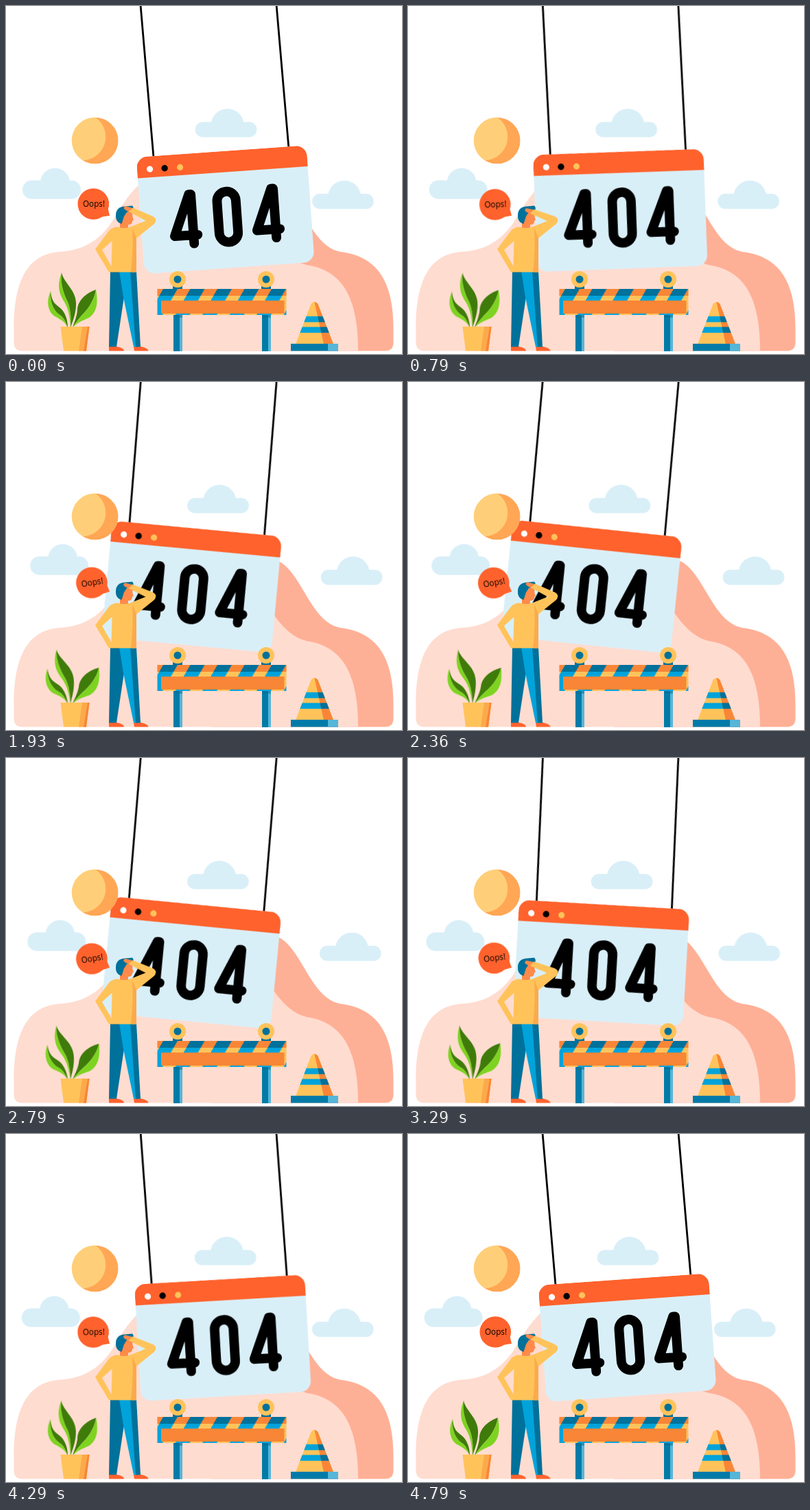
Recreate the animation shown at these times as an HTML page. Size 577 by 508 pixels, loop 4.87 s.

```html
<!DOCTYPE html>
<html lang="en">
<head>
<meta charset="utf-8">
<title>404</title>
<style>
  html, body { margin: 0; width: 100%; height: 100%; overflow: hidden; background: #fff; }
  svg { display: block; width: 577px; height: 508px; }

  .turn, .drift, .nod {
    animation: turn 4870ms cubic-bezier(.5, 0, .5, 1) infinite;
  }
  .drift { animation-name: drift; }
  .nod { animation-name: nod; }

  /* out and back, then a short rest before the loop restarts */
  @keyframes turn {
    0%, 98.4%, 100% { transform: rotate(0deg); }
    49.2% { transform: rotate(var(--a)); }
  }
  @keyframes drift {
    0%, 98.4%, 100% { transform: translateX(0); }
    49.2% { transform: translateX(var(--d)); }
  }
  @keyframes nod {
    0%, 49.2%, 98.4%, 100% { transform: rotate(0deg); }
    24.6%, 73.8% { transform: rotate(var(--a)); }
  }

  .sign { --a: 10deg; transform-origin: 285px 0; }
  .bubble { --a: -10deg; transform-origin: 150.5px 305.5px; }
  .leaf-l { --a: -5.5deg; transform-origin: 90px 470px; }
  .leaf-m { --a: -5.7deg; transform-origin: 94px 470px; }
  .leaf-r { --a: 5deg; transform-origin: 97px 470px; }
  .arm { --a: -6deg; transform-origin: 213px 312px; }
  .cloud-l { --d: 12.4px; animation-delay: -570ms; }
  .cloud-m { --d: -12.2px; }
  .cloud-r { --d: 13px; animation-delay: -300ms; }

  .red { fill: #ff622c; }
  .orange { fill: #f98637; }
  .amber { fill: #fbaa4b; }
  .yellow { fill: #ffc35a; }
  .navy { fill: #00719a; }
  .blue { fill: #00a3da; }
  .steel { fill: #007ba8; }
  .pale { fill: #55b6d8; }
  .ice { fill: #d9eff8; }
  .green { fill: #7ed321; }
  .moss { fill: #3f7b0a; }
  .skin { fill: #ff8a4a; }
  .digits { fill: none; stroke: #000; stroke-width: 13.8; stroke-linecap: round; stroke-linejoin: round; }
  text { font: 11.7px "Open Sans", "Noto Sans", sans-serif; fill: #000; }
</style>
</head>
<body>
<svg viewBox="0 0 577 508" xmlns="http://www.w3.org/2000/svg">
  <defs>
    <clipPath id="sunClip"><circle cx="129.7" cy="196.5" r="34"/></clipPath>
    <clipPath id="signClip"><rect width="248.5" height="171" rx="16"/></clipPath>
    <clipPath id="coneClip"><path d="M444.500 435Q449.500 429 454.500 435L477 493.500H422Z"/></clipPath>
    <pattern id="bars" width="39.5" height="40" patternUnits="userSpaceOnUse" patternTransform="translate(229 413) skewX(-30)">
      <rect width="39.5" height="40" class="orange"/>
      <rect width="21" height="40" class="navy"/>
    </pattern>
    <pattern id="barsLight" width="39.5" height="40" patternUnits="userSpaceOnUse" patternTransform="translate(229 413) skewX(-30)">
      <rect width="39.5" height="40" class="yellow"/>
      <rect width="21" height="40" class="blue"/>
    </pattern>
    <g id="cloud" class="ice">
      <rect y="19.300" width="89.700" height="22.200" rx="11.100"/>
      <path d="M23 36V24A24 24 0 0 1 71 24V36Z"/>
    </g>
    <path id="four" d="M75.500 131.500V59.500H72.500L48 119H81.500"/>
    <g id="lamp">
      <rect x="-7" y="8" width="14" height="7" class="navy"/>
      <circle r="12" class="yellow"/>
      <circle r="5.500" class="navy"/>
    </g>
    <g id="post">
      <rect width="13" height="54" class="steel"/>
      <rect x="9" width="4" height="54" class="pale"/>
      <rect width="13" height="5" class="navy" opacity=".5"/>
    </g>
  </defs>

  <!-- hills -->
  <path fill="#feb096" d="M398 262C432 280 444 351 488 359C539 365 564.500 400 564.500 470V491Q564.500 503.500 552 503.500H300V262Z"/>
  <path fill="#ffdcd0" d="M24 503.500Q11.500 503.500 11.500 491V470C11.500 395 35 360 82 358.500C128 355 148 326 160 306C175 280 190 262 205 252C250 225 330 255 391 341C405 360 420 374 438 378C492 386 513 428 513 503.500Z"/>

  <!-- clouds -->
  <g class="drift cloud-l">
    <rect x="22.800" y="254.500" width="85" height="27.300" rx="13.600" class="ice"/>
    <circle cx="70.300" cy="258" r="21.500" class="ice"/>
  </g>
  <g class="drift cloud-m"><use href="#cloud" x="275.700" y="150"/></g>
  <g class="drift cloud-r"><use href="#cloud" x="445.800" y="254.700"/></g>

  <!-- hanging window -->
  <g class="turn sign">
    <path d="M193.600 -30L215.100 222M391.600 -30L412 208" stroke="#000" stroke-width="2.800"/>
    <g transform="translate(189.600 220.900) rotate(-4.070)">
      <g clip-path="url(#signClip)">
        <rect width="249" height="171" class="ice"/>
        <rect width="249" height="30.800" class="red"/>
      </g>
      <circle cx="18.700" cy="18.600" r="4.600" fill="#fff"/>
      <circle cx="40.300" cy="18.800" r="4.700"/>
      <circle cx="62.800" cy="19" r="4.600" class="yellow"/>
      <g class="digits">
        <use href="#four"/>
        <rect x="113" y="59" width="27.400" height="74" rx="13.700"/>
        <use href="#four" x="120.200"/>
      </g>
    </g>
  </g>

  <!-- sun -->
  <g clip-path="url(#sunClip)">
    <circle cx="129.700" cy="196.500" r="34" fill="#ffa755"/>
    <circle cx="111" cy="191" r="34.300" fill="#ffce78"/>
  </g>

  <!-- speech bubble -->
  <g class="turn bubble">
    <circle cx="127.300" cy="289" r="22.800" class="red"/>
    <path class="red" d="M138 308L151 306L148 293Z"/>
    <text x="128" y="292.500" text-anchor="middle">Oops!</text>
  </g>

  <!-- plant -->
  <g class="turn leaf-l">
    <path class="green" d="M65 416C58 432 61 446 71 453C81 458 87 462 90 470C87 460 84 455 80 452C71 446 64 436 65 416Z"/>
    <path class="moss" d="M65 416C66 430 71 435 78 440C86 446 90 458 90 470C87 460 84 455 80 452C71 446 64 436 65 416Z"/>
  </g>
  <g class="turn leaf-r">
    <path class="moss" d="M131 414C114 420 104 432 104 444C103 455 99 462 97 470C100 464 104 459 110 452C118 444 128 432 131 414Z"/>
    <path class="green" d="M131 414C134 430 134 446 121 455C110 460 102 463 97 470C100 464 104 459 110 452C118 444 128 432 131 414Z"/>
  </g>
  <g class="turn leaf-m">
    <path class="green" d="M81 389C74 408 77 420 85 432C92 444 93 456 94 470C95 458 95 445 90 432C84 420 79 405 81 389Z"/>
    <path class="moss" d="M81 389C84 405 104 415 102 438C101 452 97 460 94 470C95 458 95 445 90 432C84 420 79 405 81 389Z"/>
  </g>
  <path class="yellow" d="M79.500 468H121.500L117 503.500H84Z"/>
  <path class="amber" d="M111 468H121.500L117 503.500H106Z"/>
  <path class="orange" d="M119 468H121.500L117 503.500H113Z"/>

  <!-- man -->
  <path class="red" d="M150 503.500V497H161Q172 499 172 503.500ZM187 503.500L186 497H196Q207 499 207.500 503.500Z"/>
  <path class="navy" d="M152 387H177L172 425L161 497.500H150Z"/>
  <path class="blue" d="M165 387H187L194 497.500H186L171 425Z"/>
  <path class="navy" d="M181 387H190L196 497.500H189Z"/>
  <path class="skin" d="M171 302L184 300L184.500 308L186 313H184.300C184 318 181 320 178 319V327H166V313Z"/>
  <path class="navy" d="M160 306C160 296 166 293 173 292.500L184 291.500Q187 294 185 299L176 301L172 307L168.500 318C162 316 160 312 160 306Z"/>
  <path class="yellow" d="M163 322.500Q172 326 181 322.500L205 313L216 309Q220 313 216 318L190 339V388.500H150L130 355L150 328Q155 322.500 163 322.500ZM154.500 343L140 356L153.500 380Z" fill-rule="evenodd"/>
  <path class="amber" d="M184 324L190 339V388.500H182Q186 355 184 324Z"/>
  <g class="nod arm">
    <path class="skin" d="M186 295.500L174 292Q170 294 173 297L183 303Z"/>
    <path class="yellow" d="M218 314C219 311 217 309 214 307L185 294.500L179 300L208 316L215 318Z"/>
  </g>

  <!-- barricade -->
  <use href="#post" x="244" y="450"/>
  <use href="#post" x="373" y="450"/>
  <use href="#lamp" x="250" y="399"/>
  <use href="#lamp" x="379" y="399"/>
  <rect x="220.500" y="413" width="188" height="38" fill="url(#barsLight)"/>
  <rect x="220.500" y="413" width="188" height="10" fill="url(#bars)"/>
  <rect x="226" y="430" width="179.500" height="19" class="orange"/>

  <!-- cone -->
  <g clip-path="url(#coneClip)">
    <rect x="420" y="430" width="60" height="64" class="yellow"/>
    <path class="blue" d="M420 453H480V461.500H420ZM420 468.500H480V477H420Z"/>
    <path class="orange" d="M449 430L463 494H480V430Z"/>
    <path class="navy" d="M454 453H480V461.500H456ZM457.400 468.500H480V477H459.300Z"/>
  </g>
  <rect x="415" y="493" width="69" height="10.500" class="steel"/>
  <rect x="469" y="493" width="15" height="10.500" class="pale"/>
</svg>
</body>
</html>
```
